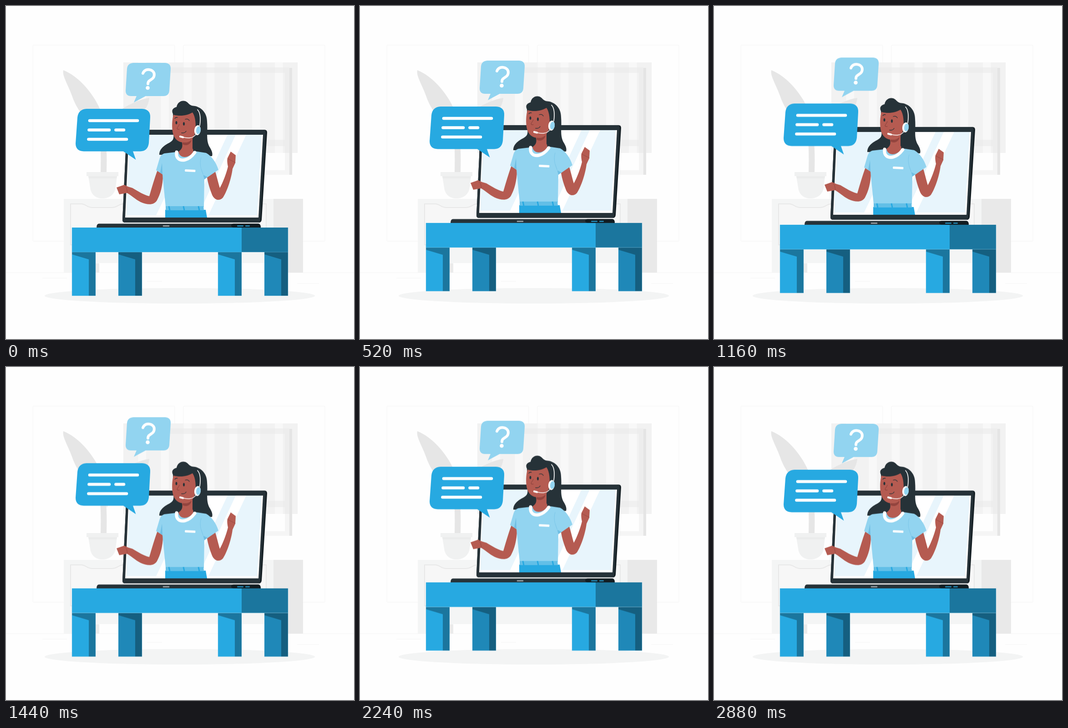
Animation, 765 px wide and 732 px high, one loop 2.92 s. Source, as an HTML page:

```html
<!DOCTYPE html>
<html lang="en">
<head>
<meta charset="utf-8">
<title>Online support</title>
<style>
  html, body { margin: 0; width: 100%; height: 100%; overflow: hidden; background: #fefefe; }
  svg { display: block; width: 765px; height: 732px; }
  .skin { fill: #b55b51; }
  .dark { fill: #263238; }
  .blue { fill: #27a9e1; }
  .shade { fill: #1b769e; }
  .pale { fill: #92d4f0; }
  .line { fill: none; stroke-linecap: round; stroke-linejoin: round; }
  .white { stroke: #fff; }
</style>
</head>
<body>
<svg viewBox="0 0 765 732">
  <defs>
    <g id="leg">
      <path d="M0 0H52V96H0Z"/>
      <path class="side" d="M0 0H52V96H37V16L0 5Z"/>
      <path d="M0 0V96H52V0" fill="none" stroke="#8ccbe6" stroke-opacity=".55" stroke-width=".8"/>
    </g>
    <clipPath id="screen"><path d="M270 283H565L555 465H262Z"/></clipPath>
  </defs>

  <!-- Room -->
  <g fill="none" stroke="#f8f8f8" stroke-width="1.5">
    <rect x="59" y="86" width="312" height="431" rx="2"/>
    <rect x="390" y="86" width="311" height="431" rx="2"/>
    <path d="M0 586H765M80 598H134M310 605H343M640 610H688" stroke="#f4f4f4" stroke-width="1"/>
  </g>
  <ellipse cx="382" cy="637" rx="297" ry="17" fill="#f3f4f4"/>

  <!-- Window and blind -->
  <path d="M270 136H629V371H270Z" fill="#f5f5f5"/>
  <path d="M286 147H613V361H286Z" fill="#fefefe"/>
  <path d="M258 124H641V323H258Z" fill="#f8f8f8"/>
  <g id="stripes" fill="#f2f2f2"></g>
  <path d="M270 135H623V147H270ZM270 294H613V308H270ZM613 147H623V323H613Z" fill="#e4e4e4" opacity=".4"/>
  <path d="M623 136H629V371H623Z" fill="#e5e5e5"/>

  <!-- Cabinet -->
  <path d="M127 424H588V565H205V586H127Z" fill="#f4f5f5"/>
  <path d="M196 566H205V586H196Z" fill="#ebebeb"/>
  <path d="M588 424H653V586H588Z" fill="#e9e9e9"/>
  <path d="M142 525V435H165C176 435 177 443 190 443H232C246 443 247 435 258 435H572V525Z" fill="#f7f7f7" stroke="#e8e8e8" stroke-width="2"/>

  <!-- Plant -->
  <path d="M126 141C159 154 190 190 206 225C218 260 223 300 221 365H208C209 320 208 290 203 270C176 258 153 222 145 197C137 174 123 153 126 141Z" fill="#e6e6e6"/>
  <path d="M315 202C313 224 296 247 258 259C239 267 228 284 222 310C217 278 226 250 248 231C270 216 294 205 315 202Z" fill="#e6e6e6"/>
  <path d="M177 365H247V374H244L241 399C239 415 226 423 212 423C198 423 187 415 185 399L181 374H177Z" fill="#f0f1f1"/>
  <path d="M181 374H244L243 379H182Z" fill="#ebecec"/>

  <g id="desk">
    <!-- Table -->
    <g fill="#1f88b8" style="--s:#155f80">
      <use href="#leg" x="247" y="541"/><use href="#leg" x="568" y="541"/>
    </g>
    <g class="blue" style="--s:#1b769e">
      <use href="#leg" x="145" y="541"/><use href="#leg" x="466" y="541"/>
    </g>
    <path class="blue" d="M145 487H518V541H145Z"/>
    <path class="shade" d="M518 487H620V541H518Z"/>
    <path d="M145 487V541H620V487" fill="none" stroke="#7fc7e6" stroke-opacity=".5" stroke-width=".8"/>

    <!-- Laptop -->
    <path d="M204 478.500H555Q560 479 560 487H199Q199 479 204 478.500Z" class="dark"/>
    <path d="M500 478.500H555Q560 479 560 487H500Q495 486 495 482.500Q495 479 500 478.500Z" fill="#121c21"/>
    <path class="line" d="M346 483.500H358" stroke="#a5adb1" stroke-width="2.600"/>
    <path class="line" d="M509 483.500H521M527 483.500H535" stroke="#27a9e1" stroke-width="2"/>
    <path d="M271 272H568Q574 272 574 278L562 470Q561 476 556 476H262Q256 476 256 470L265 278Q265 272 271 272Z" fill="#141e23"/>
    <path d="M271 272H565Q571 272 571 278L559 470Q558 476 553 476H262Q256 476 256 470L265 278Q265 272 271 272Z" class="dark"/>
    <g clip-path="url(#screen)">
      <path d="M262 283H565V465H262Z" fill="#fff"/>
      <path d="M272 283H415L330 460H264Z M487 283H505L420 465H402Z M528 283H562L552 460H445Z" fill="#e8f5fc"/>
    </g>

    <!-- Agent -->
    <path class="dark" d="M367 237C363 229 367 224 375 222C377 209 391 205 399 212C406 220 410 219 416 220C432 224 442 237 442 254C444 278 439 293 447 309C452 317 455 323 453 330L337 327C337 313 349 306 360 300C369 295 369 289 368 280Z"/>
    <path class="skin" d="M333 361L345 371C345 395 339 414 332 427C325 439 310 437 296 431C284 425 274 415 266 411L249 414L243 399L260 393L268 397L278 400C290 407 304 416 315 418C320 401 326 380 333 361Z"/>
    <path class="skin" d="M442 377L460 364C464 377 467 390 470 400C477 388 485 366 488 353C486 344 486 337 487 334L494 320L505 328L504 345L498 358C496 376 487 406 477 421C470 429 459 428 453 415C448 402 444 390 442 377Z"/>
    <path class="line" d="M261 396L265 400L267 410M488 336L504 344" stroke="#8f4640" stroke-width=".8"/>
    <path d="M350 448H439L442 465H350Z" class="blue"/>
    <path class="pale" d="M374 321L348 324Q341 326 338 334L330 361L344 370L351 442H435L436 381L467 360C461 342 452 330 440 323L414 319Z"/>
    <path d="M343 345L344 370L339 366ZM430 357L436 381L443 376L433 371Z" fill="#6fbfe4"/>
    <path class="line" d="M429 333C425 345 428 359 433 369" stroke="#77c5e7" stroke-width=".8"/>
    <path d="M351 440H434L435 449H351Z" fill="#62bfe7"/>
    <path d="M358 440L360 449M390 440L392 449M423 440L425 449" stroke="#27a9e1" stroke-width="3"/>
    <path d="M394 359L416 360Q417 362 416 365L394 364Q392 362 394 359Z" fill="#fff"/>

    <path class="skin" d="M387 291H410V313C414 319 411 325 403 329C393 335 381 332 379 320C386 316 389 310 387 301Z"/>
    <path class="line white" d="M375 321C373 335 382 341 394 338C403 336 409 330 415 322" stroke-width="7" stroke-linecap="butt"/>
    <path d="M388 298C394 302 402 300 408 294C406 304 398 309 388 304Z" fill="#93443e"/>
    <path class="skin" d="M368 239C383 243 398 241 410 234C417 244 418 262 416 277C413 290 407 299 394 300C380 301 370 293 367 280C364 267 365 250 368 239Z"/>
    <g class="dark">
      <ellipse cx="374.500" cy="256.500" rx="2" ry="3.600"/><ellipse cx="391" cy="259" rx="2" ry="3.800"/>
    </g>
    <path class="line" d="M371 247Q374 244 377 245M394 249Q400 247 403 252M386 279Q393 280 396 275" stroke="#263238" stroke-width="1.300"/>
    <path class="line" d="M381 260C380 265 374 268 377 271H381" stroke="#813c38" stroke-width="1"/>
    <path class="line white" d="M421 228C427 234 428 248 426 263" stroke-width="1.700"/>
    <path class="line white" d="M418 281C412 292 398 291 388 288" stroke-width="1.400"/>
    <path class="line white" d="M383 287L389 288.500" stroke-width="4.200"/>
    <ellipse cx="421" cy="273" rx="7" ry="11" fill="#fff" transform="rotate(8 421 273)"/>
    <ellipse cx="423" cy="273" rx="5" ry="8.500" class="pale" transform="rotate(8 423 273)"/>
  </g>

  <g id="bubbles">
    <path class="pale" d="M280 125H350Q363 126 362 139L359 186Q358 198 346 198H307L281 212L287 198H275Q263 198 263 186L266 138Q267 126 280 125Z"/>
    <path class="line white" d="M301 148C304 140 312 138 319 141C328 145 328 156 320 161C314 165 312 166 312 171" stroke-width="6"/>
    <circle cx="311.500" cy="180" r="4.300" fill="#fff"/>
    <path class="blue" d="M177 226H299Q318 227 317 245L314 301Q312 319 295 319.500H279L285.500 338L258 319.500H171Q153 319 153 302L157 245Q159 227 177 226Z"/>
    <path class="line white" d="M184 252H289M182.500 272.500H227M241.500 272.500H259M181.500 293H265" stroke-width="6.600"/>
  </g>
</svg>
<style>.side { fill: var(--s); }</style>
<script>
const LOOP = 2920, FRAME = 40, RISE = 14.8;
const $ = id => document.getElementById(id);

$("stripes").innerHTML = Array.from({ length: 8 }, (_, i) =>
  `<rect x="${258 + i * 50.1}" y="124" width="32.5" height="199"/>`).join("");

// Each entry is [time in ms, height as a share of RISE].
function float(id, steps) {
  const frames = steps.map(([ms, h]) => ({
    offset: ms / LOOP,
    transform: `translateY(${-h * RISE}px)`
  }));
  $(id).animate(frames, {
    duration: LOOP,
    iterations: Infinity,
    easing: `steps(${LOOP / FRAME})`
  });
}

float("desk", [[0, 0], [40, 0], [740, 1], [1460, 0], [2180, 1], [2900, 0], [LOOP, 0]]);
float("bubbles", [[0, 0], [40, 0], [1460, 1], [2900, 0], [LOOP, 0]]);
</script>
</body>
</html>
```
